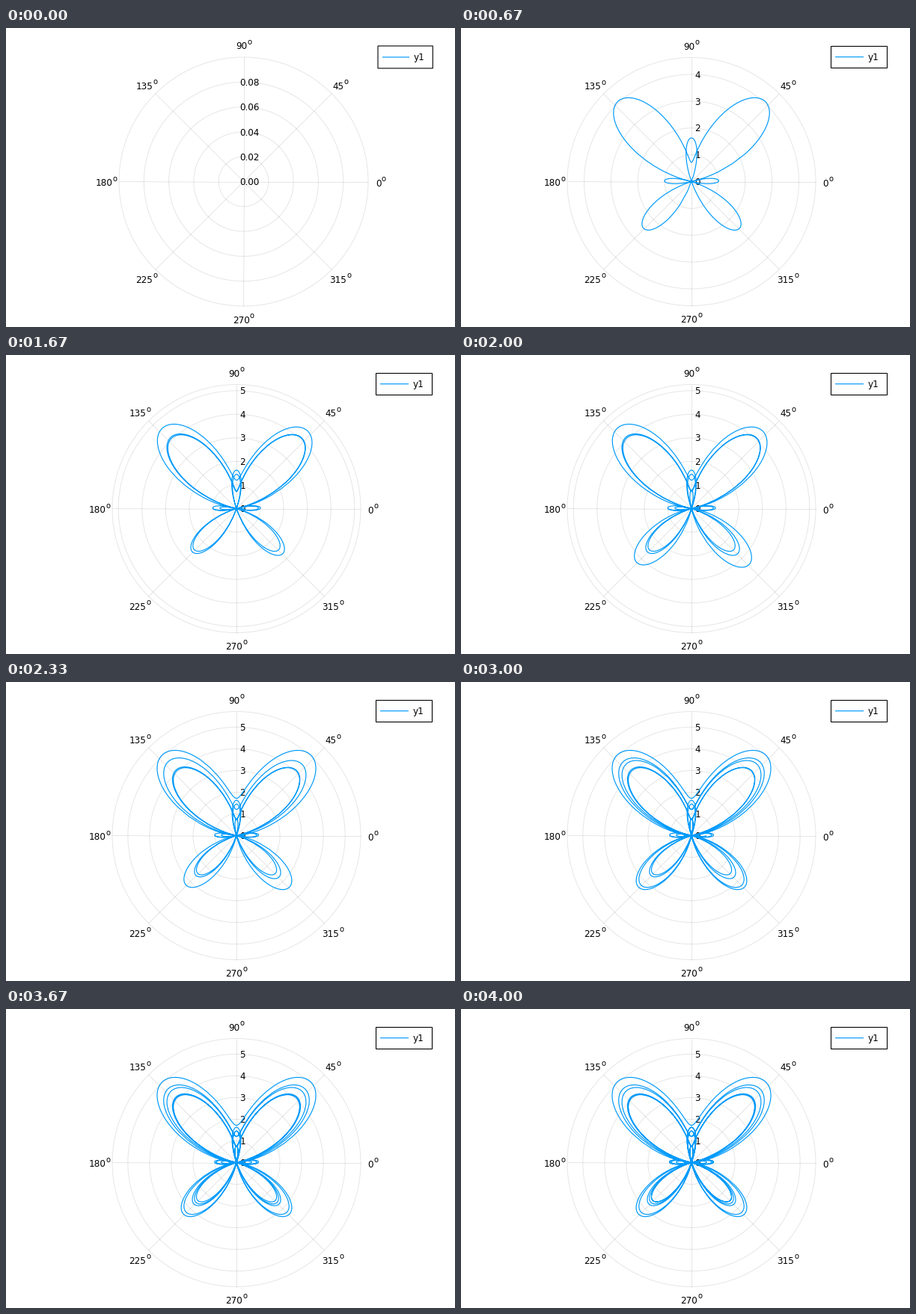
Recreate the animation shown at these times as a matplotlib script. Size 600 px wide and 400 px high, loop 4330 ms.

```python
import matplotlib.pyplot as plt
import numpy as np
from matplotlib.animation import FuncAnimation
from matplotlib.collections import LineCollection
from matplotlib.patches import Rectangle

W, H, DPI = 600, 400, 100
PX = 72 / DPI                 # points per pixel
BLUE = "#009AFA"
FONT, SUP = 12, 10            # text sizes in pixels
DIGIT, RING = 0.636 * FONT, 0.612 * SUP
CY = 205.5
STATES = 13
TICK_MS, LOOP_MS = 10, 4330

plt.rcParams["font.family"] = "DejaVu Sans"
plt.rcParams["path.simplify"] = False

fig = plt.figure(figsize=(W / DPI, H / DPI), dpi=DPI, facecolor="white")
ax = fig.add_axes([0, 0, 1, 1])
ax.set_xlim(0, W)
ax.set_ylim(H, 0)
ax.axis("off")


def butterfly(t):
    return np.exp(np.sin(t)) - 2 * np.cos(4 * t) + np.sin((2 * t - np.pi) / 24) ** 5


def adaptive_grid(f, end, max_depth=7, max_curve=0.01):
    """Sample f on [0, end], halving the intervals that bend the most."""
    rng = np.random.default_rng(1337)
    x = np.linspace(0, end, 21)
    x[1] *= 0.25
    x[-2] = x[-1] - 0.25 * (x[-1] - x[-2])
    for i in range(1, len(x) - 1):
        x[i] += rng.uniform(-0.05, 0.05) * (x[i + 1] - x[i - 1])
    depth = np.zeros(10, int)
    while True:
        y = f(x)
        slope = np.diff(y) / np.diff(x)
        bend = np.zeros(len(x))
        bend[1:-1] = 2 * np.abs(np.diff(slope)) * (x[2:] - x[:-2]) / np.ptp(y)
        curve = 0.25 * bend[:-2:2] + 0.5 * bend[1:-1:2] + 0.25 * bend[2::2]
        curve[0], curve[-1] = curve[1], curve[-2]
        active = np.flatnonzero((curve > max_curve) & (depth < max_depth))
        if not len(active):
            return x, y
        order = np.argsort(curve[active], kind="stable")
        chosen = active[order[-(len(depth) // 2):]]
        split = np.zeros(len(depth), int)
        split[chosen] = 1
        left, mid, right = x[2 * chosen], x[2 * chosen + 1], x[2 * chosen + 2]
        x = np.sort(np.concatenate([x, (left + mid) / 2, (mid + right) / 2]))
        depth = np.repeat(depth + split, 1 + split)


def label(x, y, text, size=FONT):
    return ax.text(x, y, text, fontsize=size * PX, color="black",
                   ha="left", va="baseline", zorder=2)


def line(x, y):
    return ax.plot(x, y, color=BLUE, lw=0.85, zorder=3, snap=False,
                   solid_joinstyle="round", solid_capstyle="butt")[0]


def polar_grid(cx, radius, radii):
    turn = np.linspace(0, 2 * np.pi, 181)
    paths = [np.column_stack([cx + r * np.cos(turn), CY - r * np.sin(turn)])
             for r in radii if r > 0]
    for a in np.arange(8) * np.pi / 4:
        paths.append([(cx, CY), (cx + radius * np.cos(a), CY - radius * np.sin(a))])
    grid = LineCollection(paths, colors=[(0, 0, 0, 0.1)], linewidths=0.7, zorder=1)
    return ax.add_collection(grid)


def angle_labels(cx, radius):
    parts = []
    for deg in range(0, 360, 45):
        a = np.radians(deg)
        x = cx + 1.1 * radius * np.cos(a)
        y = CY - 1.1 * radius * np.sin(a)
        width = DIGIT * len(str(deg))
        x -= (width + RING) / 2
        parts.append(label(x, y + 6, str(deg)))
        parts.append(label(x + width, y - 0.8, "o", SUP))
    return parts


def legend(box, sample, text_x):
    x0, y0, x1, y1 = box
    frame = Rectangle((x0, y0), x1 - x0, y1 - y0, fc="white", ec="black",
                      lw=1.1 * PX, joinstyle="miter", snap=False, zorder=4)
    ax.add_patch(frame)
    key = line(sample[:2], [sample[2]] * 2)
    name = label(text_x, 43.5, "y1")
    key.set_zorder(5)
    name.set_zorder(5)
    return [frame, key, name]


def build(k):
    """All artists for the curve drawn up to k half turns."""
    if k == 0:
        cx, radius, rmax, step, fmt = 317.5, 166.5, 0.1, 0.02, "{:.2f}"
        parts = legend((497, 24, 570.3, 53.9), (503, 539, 39), 544.6)
    else:
        cx, radius, step, fmt = 308, 166, 1, "{:.0f}"
        t, r = adaptive_grid(butterfly, k * np.pi)
        rmax = r.max() + 0.1 * np.ptp(r)
        scale = radius / rmax
        parts = legend((494.5, 24.5, 569.5, 53.5), (500, 538, 38.7), 543.4)
        parts.append(line(cx + scale * r * np.cos(t), CY - scale * r * np.sin(t)))
    ticks = np.arange(0, rmax, step)
    radii = ticks / rmax * radius
    parts.append(polar_grid(cx, radius, [*radii, radius]))
    parts += angle_labels(cx, radius)
    parts += [label(312.3, CY - d + 4.6, fmt.format(v)) for v, d in zip(ticks, radii)]
    return parts


scenes = [build(k) for k in range(STATES)]
starts = [round(k * 100 / 3) for k in range(STATES)]


def draw(i):
    state = sum(s <= i for s in starts) - 1
    for k, parts in enumerate(scenes):
        for part in parts:
            part.set_visible(k == state)
    return []


anim = FuncAnimation(fig, draw, frames=LOOP_MS // TICK_MS, interval=TICK_MS,
                     init_func=lambda: draw(0), repeat=True, repeat_delay=0,
                     blit=False, cache_frame_data=False)
plt.show()
```
